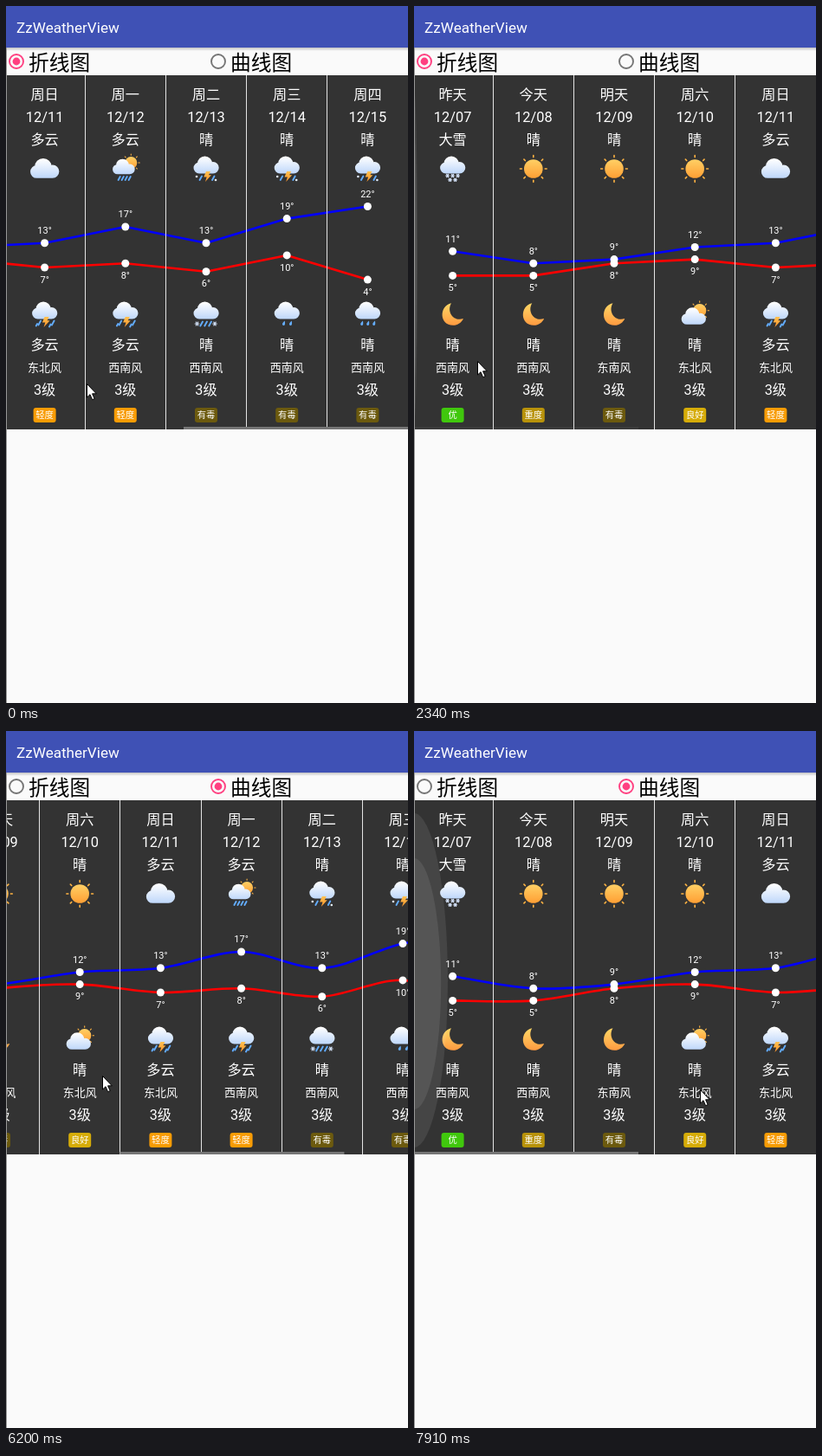
Animation of 464x805 px, one loop 8 s. Source, as an HTML page with a canvas:

```html
<!DOCTYPE html>
<html lang="zh-CN">
<head>
<meta charset="utf-8">
<title>ZzWeatherView</title>
<style>
  html, body { margin: 0; width: 100%; height: 100%; overflow: hidden; background: #fafafa; }
  canvas { display: block; width: 464px; height: 805px; }
</style>
</head>
<body>
<canvas id="stage"></canvas>
<script>
const W = 464, H = 805, LOOP = 8000;
const PANEL = { top: 80, bottom: 489 };
const PITCH = 93.2, FIRST = 44.6, MAX_SCROLL = PITCH * 4;
const FONT = 'Roboto, "Noto Sans CJK SC", "Noto Sans CJK", sans-serif';

const canvas = document.getElementById('stage');
const ctx = canvas.getContext('2d');
const dpr = window.devicePixelRatio || 1;
canvas.width = W * dpr;
canvas.height = H * dpr;

const AIR = { 优: '#40c80d', 良好: '#d6ac08', 轻度: '#f89c05', 重度: '#b8920a', 有毒: '#6c5a0e' };
// weekday, date, day weather, day icon, high, low, night icon, night weather, wind, air
const days = [
  ['昨天', '12/07', '大雪', 'snow', 11, 5, 'moon', '晴', '西南风', '优'],
  ['今天', '12/08', '晴', 'sun', 8, 5, 'moon', '晴', '西南风', '重度'],
  ['明天', '12/09', '晴', 'sun', 9, 8, 'moon', '晴', '东南风', '有毒'],
  ['周六', '12/10', '晴', 'sun', 12, 9, 'sunCloud', '晴', '东北风', '良好'],
  ['周日', '12/11', '多云', 'cloudy', 13, 7, 'thunder', '多云', '东北风', '轻度'],
  ['周一', '12/12', '多云', 'sunRain', 17, 8, 'thunder', '多云', '西南风', '轻度'],
  ['周二', '12/13', '晴', 'hailStorm', 13, 6, 'sleet', '晴', '西南风', '有毒'],
  ['周三', '12/14', '晴', 'hailStorm', 19, 10, 'drops2', '晴', '西南风', '有毒'],
  ['周四', '12/15', '晴', 'hailStorm', 22, 4, 'drops3', '晴', '西南风', '有毒'],
];

const ticks = [0, 150, 280, 430, 550, 670, 830, 980, 1130, 1280, 1410, 1530, 1680, 1800, 1920,
  2070, 2190, 2340, 2460, 2580, 2730, 2850, 2970, 3120, 3240, 3360, 4230, 4380, 4500, 4620, 4740,
  4890, 5040, 5180, 5300, 5420, 5570, 5690, 5810, 5930, 6050, 6200, 6320, 6440, 6590, 6710, 6830,
  6980, 7130, 7250, 7370, 7490, 7610, 7760, 7910];

const scrollKeys = [[0, MAX_SCROLL], [670, MAX_SCROLL], [830, 346], [980, 299], [1130, 205],
  [1280, 105], [1410, 35], [1530, 0], [5420, 0], [5570, 10], [5810, 78], [6050, 175], [6200, 239],
  [6320, 290], [6440, 328], [6590, 356], [6710, 368], [6830, MAX_SCROLL], [7130, MAX_SCROLL],
  [7250, 364], [7370, 325], [7490, 255], [7610, 135], [7760, 0]];
const cursorKeys = [[0, 93, 436], [280, 110, 438], [670, 162, 441], [980, 248, 444], [1130, 300, 440],
  [1280, 342, 432], [1530, 362, 424], [1680, 355, 421], [1920, 255, 415], [2190, 108, 411],
  [2340, 73, 410], [2580, 84, 411], [2730, 150, 418], [2850, 200, 422], [2970, 183, 421],
  [3120, 162, 410], [3240, 154, 404], [3360, 165, 400], [4230, 167, 401], [4380, 165, 398],
  [4500, 188, 320], [4620, 250, 160], [4740, 285, 70], [4890, 287, 66], [5040, 287, 66],
  [5180, 280, 95], [5300, 235, 230], [5420, 201, 320], [5570, 210, 370], [5810, 170, 388],
  [6050, 118, 397], [6200, 111, 398], [6830, 109, 399], [6980, 118, 400], [7250, 130, 402],
  [7490, 230, 408], [7610, 285, 412], [7760, 325, 414], [7910, 330, 414]];
const leftGlowKeys = [[1530, 0], [1680, 32], [1800, 36], [2070, 22], [2340, 4], [2460, 0], [7610, 0], [7760, 30], [7910, 39]];
const rightGlowKeys = [[6830, 0], [6980, 22], [7130, 13], [7250, 0]];
const barKeys = [[0, 1], [2070, 1], [2340, 0.12], [2460, 0], [5420, 0], [5570, 1]];

function at(keys, t) {
  if (t <= keys[0][0]) return keys[0].slice(1);
  const next = keys.findIndex(k => k[0] > t);
  if (next < 0) return keys[keys.length - 1].slice(1);
  const a = keys[next - 1], b = keys[next];
  const u = (t - a[0]) / (b[0] - a[0]);
  return a.slice(1).map((v, i) => v + (b[i + 1] - v) * u);
}

function text(str, x, y, size, color = '#fff', align = 'center', weight = 400) {
  ctx.font = `${weight} ${size}px ${FONT}`;
  ctx.textAlign = align;
  ctx.fillStyle = color;
  ctx.fillText(str, x, y + size * 0.37);
}

function rect(x, y, w, h, color) {
  ctx.fillStyle = color;
  ctx.fillRect(x, y, w, h);
}

function disc(x, y, r, color) {
  ctx.fillStyle = color;
  ctx.beginPath();
  ctx.arc(x, y, r, 0, Math.PI * 2);
  ctx.fill();
}

function stroke(x1, y1, x2, y2, color, width) {
  ctx.strokeStyle = color;
  ctx.lineWidth = width;
  ctx.beginPath();
  ctx.moveTo(x1, y1);
  ctx.lineTo(x2, y2);
  ctx.stroke();
}

function shade(y1, y2, from, to) {
  const g = ctx.createLinearGradient(0, y1, 0, y2);
  g.addColorStop(0, from);
  g.addColorStop(1, to);
  return g;
}

function placed(x, y, scale, draw) {
  ctx.save();
  ctx.translate(x, y);
  ctx.scale(scale, scale);
  draw();
  ctx.restore();
}

function cloud() {
  ctx.fillStyle = shade(-14, 6, '#ffffff', '#bdd6fa');
  ctx.beginPath();
  for (const [x, y, r] of [[-1.5, -6, 8.6], [-8, -1, 6.5], [8, -1.3, 6.7]]) {
    ctx.moveTo(x + r, y);
    ctx.arc(x, y, r, 0, Math.PI * 2);
  }
  ctx.rect(-8, -4, 16, 9.4);
  ctx.fill();
}

function sun(x, y, r) {
  ctx.lineCap = 'round';
  for (let i = 0; i < 8; i++) {
    const c = Math.cos(i * Math.PI / 4), s = Math.sin(i * Math.PI / 4);
    stroke(x + c * r * 1.24, y + s * r * 1.24, x + c * r * 1.42, y + s * r * 1.42, '#ffb443', r * 0.15);
  }
  disc(x, y, r, shade(y - r, y + r, '#ffd065', '#ff9f34'));
}

function bolt() {
  ctx.fillStyle = shade(3, 15, '#ffc252', '#ff9428');
  ctx.beginPath();
  [[0, 3], [5, 3], [3, 7.3], [6, 7.3], [-1, 15], [0.7, 9.5], [-2.7, 9.5]].forEach(p => ctx.lineTo(...p));
  ctx.fill();
}

function slash(x, y, length = 5) {
  ctx.lineCap = 'round';
  stroke(x, y, x - length * 0.55, y + length, '#63adff', 1.9);
}

function flake(x, y, r = 1.9) {
  ctx.lineCap = 'round';
  for (let i = 0; i < 3; i++) {
    const c = Math.cos(i * Math.PI / 3) * r, s = Math.sin(i * Math.PI / 3) * r;
    stroke(x - c, y - s, x + c, y + s, '#d9e8ff', 1.2);
  }
}

function drop(x, y) {
  ctx.fillStyle = '#65adfa';
  ctx.beginPath();
  ctx.moveTo(x + 1.5, y - 3);
  ctx.quadraticCurveTo(x + 2.7, y + 2.6, x, y + 2.5);
  ctx.quadraticCurveTo(x - 3.2, y + 1.5, x + 1.5, y - 3);
  ctx.fill();
}

const icons = {
  cloudy() { placed(0, 4.6, 1.14, cloud); },
  sun() { sun(0, 0, 10.8); },
  moon() {
    ctx.fillStyle = shade(-13, 13, '#ffd866', '#ff9a40');
    ctx.beginPath();
    ctx.moveTo(-1.5, -12.8);
    ctx.bezierCurveTo(-16, -9.5, -15.5, 12.5, 0.5, 12.8);
    ctx.bezierCurveTo(6, 12.8, 10.5, 9.5, 12.3, 5);
    ctx.bezierCurveTo(1, 9, -7.5, -3, -1.5, -12.8);
    ctx.fill();
  },
  sunCloud() { sun(5.5, -4.3, 7.6); placed(-1.5, 6.5, 0.97, cloud); },
  sunRain() {
    sun(6.5, -7, 7);
    placed(-2, 1.5, 0.88, cloud);
    [-6, -2, 2, 6].forEach(x => slash(x, 9, 4));
  },
  snow() {
    cloud();
    [-6, 0, 6].forEach(x => flake(x, 8));
    [-3, 3].forEach(x => flake(x, 12.8));
  },
  thunder() {
    cloud();
    slash(-4.5, 7.5); slash(-8.5, 11, 2.5); slash(11, 7.5); slash(7, 11.5, 3);
    bolt();
  },
  hailStorm() {
    cloud();
    slash(-5, 8.5, 4.5); slash(9.5, 8.5, 4.5);
    disc(-11, 9, 1.3, '#e4efff'); disc(11, 13, 1.3, '#e4efff');
    bolt();
  },
  sleet() {
    cloud();
    [-4, 1, 6].forEach(x => slash(x, 8.5));
    flake(-10.5, 11, 2.3); flake(10, 11, 2.3);
  },
  drops2() { cloud(); drop(-4, 10.5); drop(4, 10.5); },
  drops3() { cloud(); [-7, 0, 7].forEach(x => drop(x, 10.5)); },
};

const tempY = temp => 283.2 - (temp - 11) * 4.7;

function chartLine(field, color, curved) {
  const p = days.map((d, i) => [FIRST + i * PITCH, tempY(d[field])]);
  const point = i => p[Math.max(0, Math.min(p.length - 1, i))];
  const bend = 0.16;
  ctx.beginPath();
  ctx.moveTo(...p[0]);
  for (let i = 1; i < p.length; i++) {
    const [before, a, b, after] = [point(i - 2), p[i - 1], p[i], point(i + 1)];
    if (!curved) ctx.lineTo(...b);
    else ctx.bezierCurveTo(
      a[0] + bend * (b[0] - before[0]), a[1] + bend * (b[1] - before[1]),
      b[0] - bend * (after[0] - a[0]), b[1] - bend * (after[1] - a[1]), ...b);
  }
  ctx.strokeStyle = color;
  ctx.lineWidth = 2.6;
  ctx.lineJoin = 'round';
  ctx.stroke();
}

function column(day, x, scroll) {
  const [week, date, weather, icon, high, low, nightIcon, nightWeather, wind, air] = day;
  text(week, x, 102, 16.2);
  text(date, x, 128, 16.4);
  text(weather, x, 154, 16.2);
  placed(x, 188, 1, icons[icon]);
  const highY = tempY(high), lowY = tempY(low);
  disc(x, highY, 4.5, '#fff');
  disc(x, lowY, 4.5, '#fff');
  text(high + '°', x, highY - 14.6, 11);
  text(low + '°', x, lowY + 13.6, 11);
  placed(x, 356, 1, icons[nightIcon]);
  text(nightWeather, x, 391, 16.2);
  text(wind, x, 417, 13);
  text('3级', x, 443, 16.2);
  ctx.fillStyle = AIR[air];
  ctx.beginPath();
  ctx.roundRect(x - 13, 464, 26, 17, 3);
  ctx.fill();
  text(air, x, 472.6, 10.3);
  rect(Math.round(x - scroll + 46.2) + scroll, PANEL.top, 1, PANEL.bottom - PANEL.top, '#e4e4e4');
}

function glow(x, depth) {
  if (depth <= 0) return;
  const ellipse = (y, rx, ry) => {
    ctx.fillStyle = 'rgba(255,255,255,0.085)';
    ctx.beginPath();
    ctx.ellipse(x, y, rx, ry, 0, 0, Math.PI * 2);
    ctx.fill();
  };
  ellipse(288, depth, 193);
  ellipse(292, depth * 0.8, 145);
}

function panel(t) {
  const [scroll] = at(scrollKeys, t);
  ctx.save();
  ctx.beginPath();
  ctx.rect(1, PANEL.top, W - 1, PANEL.bottom - PANEL.top);
  ctx.clip();
  rect(0, PANEL.top, W, PANEL.bottom - PANEL.top, '#333333');
  ctx.save();
  ctx.translate(-scroll, 0);
  ctx.lineCap = 'butt';
  chartLine(4, '#0000ff', t >= 5040);
  chartLine(5, '#ff0000', t >= 5040);
  days.forEach((day, i) => column(day, FIRST + i * PITCH, scroll));
  ctx.restore();
  glow(0, at(leftGlowKeys, t)[0]);
  glow(W, at(rightGlowKeys, t)[0]);
  const thumb = 259;
  ctx.globalAlpha = at(barKeys, t)[0];
  rect(scroll / MAX_SCROLL * (W - thumb), 486, thumb, 3, '#757575');
  ctx.restore();
}

function radio(x, label, selected) {
  const color = selected ? '#ff4081' : '#757575';
  ctx.strokeStyle = color;
  ctx.lineWidth = 1.9;
  ctx.beginPath();
  ctx.arc(x, 64, 8, 0, Math.PI * 2);
  ctx.stroke();
  if (selected) disc(x, 64, 4.4, color);
  text(label, x + 14, 65, 23.7, '#000', 'left');
}

function cursor(x, y) {
  ctx.beginPath();
  [[0.5, 0.5], [0.5, 16], [4, 12.7], [6.6, 18.7], [9.2, 17.6], [6.6, 11.8], [11.3, 11.8]]
    .forEach(([dx, dy]) => ctx.lineTo(x + dx, y + dy));
  ctx.closePath();
  ctx.fillStyle = '#fff';
  ctx.strokeStyle = '#000';
  ctx.lineWidth = 1;
  ctx.fill();
  ctx.stroke();
}

function draw(t) {
  ctx.setTransform(dpr, 0, 0, dpr, 0, 0);
  rect(0, 0, W, H, '#fafafa');
  if (t >= 4890 && t < 5040) rect(231, 48, W - 231, 32, '#e1e1e1');
  rect(0, 48, W, 4, shade(48, 52, 'rgba(0,0,0,0.22)', 'rgba(0,0,0,0)'));
  rect(0, 0, W, 48, '#3f51b5');
  text('ZzWeatherView', 12, 24.7, 17.1, '#fff', 'left');
  radio(12, '折线图', t < 5040);
  radio(245, '曲线图', t >= 5040);
  panel(t);
  rect(0, 48, 1, H - 48, '#969696');
  cursor(...at(cursorKeys, t));
}

const start = performance.now();
function frame() {
  const t = (performance.now() - start) % LOOP;
  draw(ticks.filter(tick => tick <= t).pop() ?? 0);
  requestAnimationFrame(frame);
}
frame();
</script>
</body>
</html>
```
